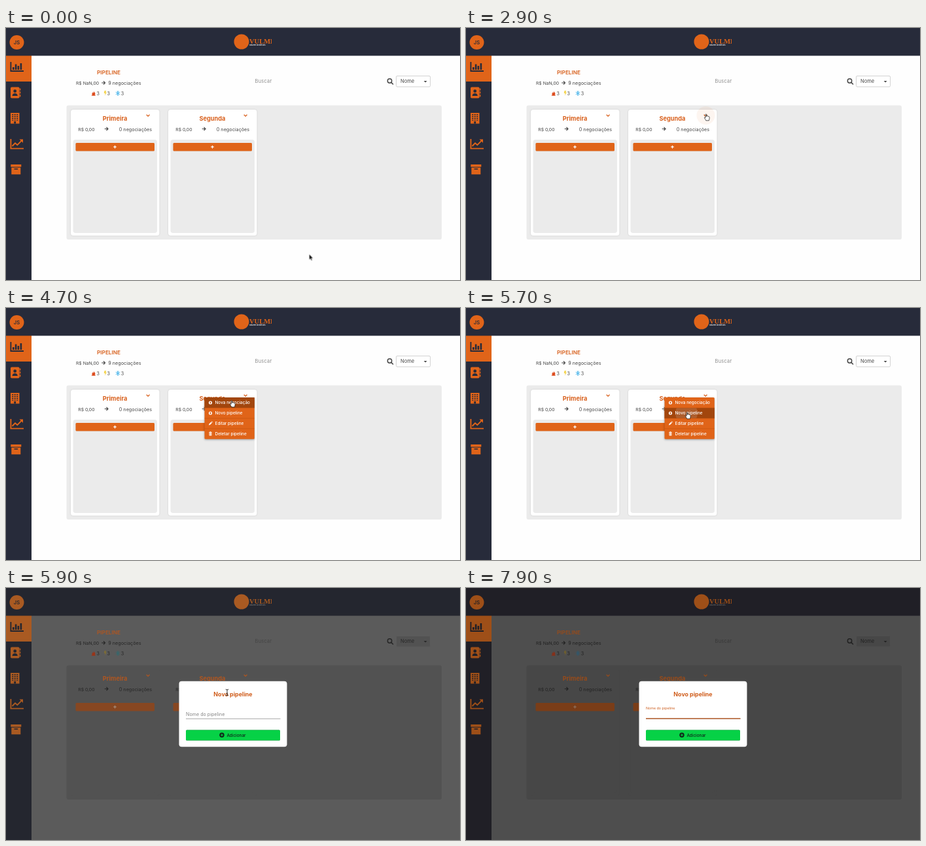
An HTML page that plays this animation: 694 px wide and 386 px high, repeating every 8000 ms.

```html
<!DOCTYPE html>
<html lang="pt">
<head>
<meta charset="utf-8">
<title>Pipeline</title>
<style>
html, body { margin: 0; width: 100%; height: 100%; overflow: hidden; background: #fefefe; }
svg { display: block; width: 694px; height: 386px; font: 7.1px Inter, "Open Sans", sans-serif; }

/* 1% = 80 ms; the screen advances every 100 ms */
.app, .step, .cursor { animation: 8s step-end infinite; }
.app { animation-name: dim; }

@keyframes dim {
  0% { --bg: #fefefe; --nav: #272b3a; --accent: #e06419; --title: #d85f1b; --btn: #e06419; --panel: #ebebeb;
       --card: #fff; --col: #ebebeb; --text: #484848; --soft: #8d8d8d; --line: #d2d2d2; --hi: #fff;
       --shade: #0002; --fire: #dc4a1c; --bolt: #f5d44a; --ice: #3aaee8; --tag: #fff; }
  72.5% { --bg: #9d9d9d; --nav: #3d3e48; --accent: #cc6c34; --title: #b9551f; --btn: #a9582b; --panel: #8f8f8f;
       --card: #9b9b9b; --col: #8f8f8f; --text: #343434; --soft: #5c5c5c; --line: #858585; --hi: #d5c2b6;
       --shade: #0001; --fire: #a8391c; --bolt: #b3a05a; --ice: #3e84a3; --tag: #bbb; }
  73.75% { --bg: #5b5b5b; --nav: #24262f; --accent: #a95a22; --title: #b05620; --btn: #874722; --panel: #525252;
       --card: #525252; --col: #525252; --text: #272727; --soft: #454545; --line: #5b5b5b; --hi: #a58a78;
       --shade: #0000; --fire: #9a3418; --bolt: #7d6d36; --ice: #2f6a70; --tag: #777; }
  75%, 100% { --bg: #4e4e4e; --nav: #201f26; --accent: #9e4f18; --title: #984b1a; --btn: #7a3d18; --panel: #474747;
       --card: #474747; --col: #474747; --text: #222; --soft: #383838; --line: #4e4e4e; --hi: #8d6f5c;
       --shade: #0000; --fire: #86301a; --bolt: #6e5f2e; --ice: #2c5a72; --tag: #666; }
}

.bg { fill: var(--bg); } .nav { fill: var(--nav); } .accent { fill: var(--accent); }
.btn { fill: var(--btn); filter: drop-shadow(0 .8px .6px var(--shade)); }
.panel { fill: var(--panel); } .col { fill: var(--col); }
.card { fill: var(--card); filter: drop-shadow(0 .5px 1px var(--shade)); }
.text { fill: var(--text); } .soft { fill: var(--soft); }
.title { fill: var(--title); font-size: 9.2px; font-weight: 700; }
.mid { text-anchor: middle; } .end { text-anchor: end; }
.ln { fill: none; stroke: var(--text); stroke-width: 1.2; }
.chev { fill: none; stroke: var(--title); stroke-width: 1.3; }
.plus { fill: none; stroke: var(--hi); stroke-width: 1.2; }
.axis { fill: none; stroke-width: 1.9; }

.menu { animation-name: menu; transform-origin: 366px 137px; filter: drop-shadow(0 1px 1.5px #0005); }
.menu text { font-size: 6.45px; font-weight: 500; fill: #fff; }
@keyframes menu {
  0% { opacity: 0; transform: scale(.8); }
  37.5% { opacity: .35; transform: scale(.8); }
  38.75% { opacity: .85; transform: scale(.95); }
  40% { opacity: 1; transform: none; }
  72.5%, 100% { opacity: 0; transform: none; }
}
.halo { animation-name: halo; }
@keyframes halo { 0% { opacity: 0; } 30% { opacity: .06; } 40%, 100% { opacity: 0; } }
.hov1 { animation-name: hov1; }
@keyframes hov1 { 0% { opacity: 0; } 50% { opacity: 1; } 66.25%, 100% { opacity: 0; } }
.hov2 { animation-name: hov2; }
@keyframes hov2 { 0% { opacity: 0; } 66.25% { opacity: 1; } 72.5%, 100% { opacity: 0; } }
.ripple { animation-name: ripple; }
@keyframes ripple { 0% { opacity: 0; } 71.25% { opacity: .13; } 72.5%, 100% { opacity: 0; } }

.dialog { animation-name: dialog; }
@keyframes dialog { 0% { opacity: 0; } 72.5%, 100% { opacity: 1; } }
.label { animation-name: label; }
@keyframes label {
  0% { transform: translate(275px, 195.7px); fill: #858585; }
  88.75% { transform: translate(275px, 190px) scale(.87); fill: #b0744f; }
  90%, 100% { transform: translate(275px, 185.8px) scale(.75); fill: #cc5c1d; }
}
.focus { animation-name: focus; }
@keyframes focus { 0% { opacity: 0; } 88.75% { opacity: .5; } 90%, 100% { opacity: 1; } }
.caret { animation-name: caret; }
@keyframes caret { 0% { opacity: 0; } 88.75% { opacity: 1; } 95%, 100% { opacity: 0; } }

.cursor { animation-name: move; animation-timing-function: linear; }
@keyframes move {
  0% { transform: translate(463.5px, 346.5px); }
  8.75% { transform: translate(463.5px, 346.5px); animation-timing-function: steps(2); }
  11.25% { transform: translate(448px, 330px); animation-timing-function: steps(2); }
  13.75% { transform: translate(400px, 285px); animation-timing-function: steps(2); }
  16.25%, 17.5% { transform: translate(364px, 251px); animation-timing-function: steps(4); }
  22.5% { transform: translate(366px, 185px); animation-timing-function: steps(5); }
  28.75% { transform: translate(368px, 137px); animation-timing-function: steps(4); }
  33.75%, 47.5% { transform: translate(367px, 132px); animation-timing-function: steps(5); }
  53.75% { transform: translate(352px, 149px); animation-timing-function: steps(4); }
  58.75% { transform: translate(345px, 142px); animation-timing-function: steps(9); }
  70%, 77.5% { transform: translate(338px, 160px); animation-timing-function: steps(9); }
  88.75%, 100% { transform: translate(333.5px, 193px); }
}
.arrow { animation-name: arrow; }
@keyframes arrow { 0% { opacity: 1; } 27.5% { opacity: 0; } 81.25% { opacity: 1; } 85%, 100% { opacity: 0; } }
.hand { animation-name: hand; }
@keyframes hand { 0% { opacity: 0; } 27.5% { opacity: 1; } 72.5%, 100% { opacity: 0; } }
.beam { animation-name: beam; }
@keyframes beam { 0% { opacity: 0; } 72.5% { opacity: 1; } 81.25% { opacity: 0; } 85% { opacity: 1; } 98.75%, 100% { opacity: 0; } }
</style>
</head>
<body>
<svg viewBox="0 0 694 386">
  <defs>
    <path id="right" class="ln" d="M-2.8 0H2.4M0-2.5 2.5 0 0 2.5"/>
    <g id="column">
      <rect class="card" x="99" y="125" width="135.5" height="193" rx="4"/>
      <rect class="col" x="102.5" y="171" width="128.5" height="143" rx="4"/>
      <path class="chev" d="M214.7 132.7 217.1 135.1 219.5 132.7"/>
      <text class="text" x="110.3" y="157.6" font-size="6.8">R$ 0,00</text>
      <use href="#right" x="153.5" y="154.5"/>
      <text class="text end" x="223.2" y="157.6" font-size="7.25">0 negociações</text>
      <rect class="btn" x="106.5" y="176" width="120.5" height="12.5" rx="1.5"/>
      <path class="plus" d="M164.2 182.2h4.6M166.5 179.9v4.6"/>
    </g>
    <g id="add">
      <circle r="2.6" fill="#fff"/>
      <path d="M-1.4 0H1.4M0-1.4V1.4" stroke="#c8560f" stroke-width=".9"/>
    </g>
    <clipPath id="row2"><rect x="303.5" y="153" width="76" height="16"/></clipPath>
    <clipPath id="brand"><rect x="340" y="0" width="66" height="42"/></clipPath>
  </defs>

  <g class="app">
    <rect class="bg" width="694" height="386"/>
    <path class="nav" d="M0 0H694V42.5H39V386H0Z"/>

    <g clip-path="url(#brand)">
      <circle class="accent" cx="360" cy="21" r="11.5"/>
      <text class="accent" x="372" y="23.6" font-family="Liberation Serif, serif" font-size="10.5" font-weight="700">VULMEN</text>
      <text x="372" y="27.2" font-size="2.7" font-weight="600" fill="var(--tag)">Smarter workflows</text>
    </g>

    <circle class="accent" cx="16.5" cy="22" r="11"/>
    <text class="nav mid" x="16.5" y="24.8" font-size="7.6" font-weight="600">JS</text>
    <rect class="accent" y="42.5" width="39" height="39.5"/>
    <g class="nav">
      <path class="axis" d="M7.4 52V66H27" style="stroke:var(--nav)"/>
      <path d="M10 60h2.6v4H10zM13.8 55.5h2.6V64h-2.6zM17.6 58h2.6v6h-2.6zM21.6 54h2.6v10h-2.6z"/>
    </g>
    <g class="accent">
      <rect x="7" y="90.5" width="13.5" height="17" rx="1.8"/>
      <path d="M20.8 92.5h1.5v3.3h-1.5zM20.8 97.3h1.5v3.3h-1.5zM20.8 102.1h1.5v3.3h-1.5z"/>
      <path d="M7 130h13.5v16.5H7z"/>
      <path class="axis" d="M7.4 170V184.6H27M9.5 181 14 176.3 17.3 179.2 24 172.4" style="fill:none;stroke:var(--accent)"/>
      <path d="M20.5 170.5H26V176Z"/>
      <path d="M7.3 209h16v3.8h-16zM8.3 213.8h14v10.4h-14z"/>
    </g>
    <g class="nav">
      <circle cx="13.7" cy="96.7" r="2.4"/>
      <path d="M9.6 104c0-5.4 8.2-5.4 8.2 0zM12.3 143h2.8v3.5h-2.8zM12.5 215.3h5.6v1.4h-5.6z"/>
      <path d="M10.2 132V142M13.7 132V142M17.2 132V142" stroke="var(--nav)" stroke-width="1.9" stroke-dasharray="1.7 1.3"/>
    </g>

    <text class="title mid" x="157" y="70.9" style="font-size:8.2px;font-weight:600">PIPELINE</text>
    <text class="text" x="107" y="87.1" font-size="6.8">R$ NaN,00</text>
    <use href="#right" x="149" y="84"/>
    <text class="text" x="156.2" y="87.1" font-size="7.25">9 negociações</text>
    <path d="M133.6 96c.3 2 3 2.6 2.8 5.2-.2 2.6-5 2.6-5 0 0-1.5 1.2-1.8 1.1-3 .9.4 1.2 1 1.2 1.8.8-.9.4-2.6-.1-4zM130.8 102.8h6v.9h-6z" fill="var(--fire)"/>
    <path d="M150.6 96h2.5l-.8 2.5h1.6l-3 5.2.7-3.8h-1.9z" fill="var(--bolt)"/>
    <path d="M171 96.3V103.7M167.8 98.2 174.2 101.8M167.8 101.8 174.2 98.2M169.7 97 171 98.2 172.3 97M169.7 103 171 101.8 172.3 103" fill="none" stroke="var(--ice)" stroke-width=".9"/>
    <g class="text"><text x="138.6" y="102.5">3</text><text x="154.6" y="102.5">3</text><text x="175.8" y="102.5">3</text></g>

    <text class="soft" x="380.5" y="84.3" font-size="7.4" letter-spacing=".3">Buscar</text>
    <g class="ln" style="stroke-width:1.5"><circle cx="586.5" cy="81" r="3.2"/><path d="M588.9 83.4 592 86.5"/></g>
    <rect x="596.5" y="73.5" width="52" height="16.5" rx="1.5" fill="var(--card)" stroke="var(--line)"/>
    <text class="text" x="603" y="84.3" font-size="7.5">Nome</text>
    <path class="text" d="M638.7 80.9h4.8l-2.4 2.5z"/>

    <rect class="panel" x="92.5" y="118.5" width="573.5" height="205.5" rx="3"/>
    <use href="#column"/>
    <use href="#column" x="149"/>
    <text class="title mid" x="166.6" y="141.7">Primeira</text>
    <text class="title mid" x="315.5" y="141.7">Segunda</text>
  </g>

  <circle class="step halo" cx="366.5" cy="134" r="14" fill="#e06419"/>

  <g class="step menu">
    <rect x="303.5" y="137" width="76.3" height="63.7" rx="1.5" fill="#e06419"/>
    <rect class="step hov1" x="303.5" y="137" width="76.3" height="16" fill="#a2460d"/>
    <rect class="step hov2" x="303.5" y="153" width="76.3" height="16" fill="#a2460d"/>
    <circle class="step ripple" cx="337" cy="161" r="17" fill="#fff" clip-path="url(#row2)"/>
    <path d="M303.5 153h76.3M303.5 169h76.3M303.5 184.8h76.3" stroke="#bf5210" stroke-width=".6"/>
    <use href="#add" x="312.5" y="145"/>
    <use href="#add" x="312.5" y="161"/>
    <path d="M310 179.4l.5-1.9 3-3 1.4 1.4-3 3zM314 174l.6-.6 1.4 1.4-.6.6z" fill="#fff"/>
    <path d="M310.2 190h4.6v.8h-4.6zM311.6 189.2h1.8v.8h-1.8zM310.6 191.3h3.8v4.2h-3.8z" fill="#fff"/>
    <path d="M311.7 192v2.8M313.3 192v2.8" stroke="#e06419" stroke-width=".5"/>
    <text x="319.5" y="147.3">Nova negociação</text>
    <text x="319.5" y="163.3">Novo pipeline</text>
    <text x="319.5" y="179.2">Editar pipeline</text>
    <text x="319.5" y="194.9">Deletar pipeline</text>
  </g>

  <g class="step dialog">
    <rect x="264.5" y="142.7" width="165" height="100.5" rx="4" fill="#fff"/>
    <text class="mid" x="347" y="166" font-size="8.9" font-weight="700" fill="#d05e1d">Novo pipeline</text>
    <text class="step label" font-size="7.16">Nome do pipeline</text>
    <path d="M275 200.3H419.5" stroke="#929292" stroke-width=".8"/>
    <path class="step focus" d="M275 200H419.5" stroke="#b8622f" stroke-width="1.3"/>
    <path class="step caret" d="M275.3 188.5V198" stroke="#333" stroke-width=".8"/>
    <rect x="275" y="217.5" width="144" height="16" rx="1.5" fill="#06d146" style="filter:drop-shadow(0 .8px .7px #0009)"/>
    <circle cx="330" cy="225.2" r="3.7" fill="#12261a"/>
    <path d="M328 225.2h4M330 223.2v4" stroke="#06d146" stroke-width="1.1"/>
    <text x="337.4" y="227.6" font-size="6.4" font-weight="500" fill="#10251a">Adicionar</text>
  </g>

  <g class="cursor">
    <path class="step arrow" d="M0 0V8.4L1.9 6.7 3.2 9.7 4.6 9.1 3.3 6.2H5.9Z" fill="#111" stroke="#fff" stroke-width=".5"/>
    <path class="step hand" d="M-.9.6C-.9-.4.7-.4.7.6V3.6C1-.1 1.3 2.8 2.2 3.1 2.6 2.8 3.6 2.9 3.7 3.6 4.3 3.3 5.1 3.7 5.1 4.5V6.8C5.1 8 4.4 8.5 4.4 9.8H-.2C-.4 8.6-2 7.1-2.5 5.6-2.7 4.6-1.6 4.6-.9 5.6Z" fill="#fff" stroke="#111" stroke-width=".7"/>
    <path class="step beam" d="M-2.2-4.8Q0-4.8 0-3.4Q0-4.8 2.2-4.8M0-3.6V3.6M-2.2 4.8Q0 4.8 0 3.4Q0 4.8 2.2 4.8M-1 1.2H1" fill="none" stroke="#222" stroke-width=".9"/>
  </g>
</svg>
</body>
</html>
```
